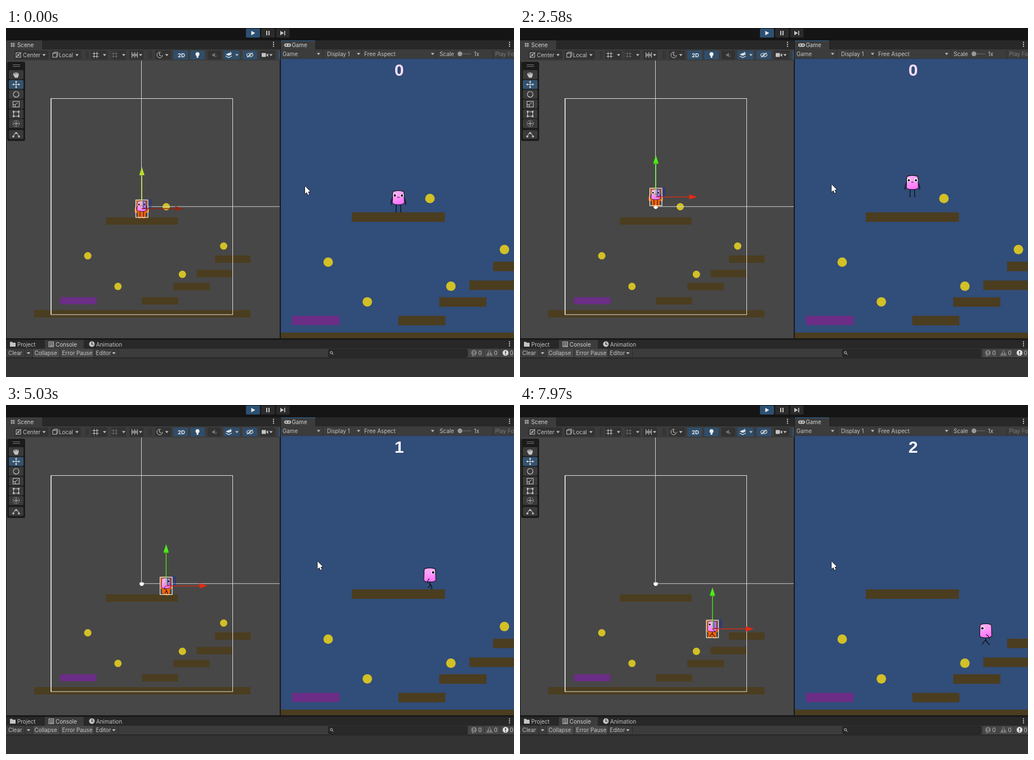
Write an HTML page with a canvas that moves like this. It is 902 px wide and 621 px high and loops after 8000 ms.

```html
<!DOCTYPE html>
<html>
<head>
<meta charset="utf-8">
<style>
html, body { margin: 0; width: 100%; height: 100%; overflow: hidden; background: #191919; }
canvas { display: block; }
</style>
</head>
<body>
<canvas id="stage" width="902" height="621"></canvas>
<script>
const ctx = document.getElementById('stage').getContext('2d');
const LOOP = 8000, ZOOM = 1.297, TAU = Math.PI * 2;
const UI = 'Inter, sans-serif';
const BROWN = '#4b3d1f', GOLD = '#d2c026', INK = '#c4c4c4', BLUE = '#304d69';

// platforms: x, y, width (scene coordinates)
const platforms = [[50, 502, 384], [177.5, 337, 127.5], [371, 404.7, 63], [338.5, 430.5, 64],
  [297.3, 453.5, 64.5], [241.3, 479, 64.3]];
// coins: x, y, time collected
const coins = [[284.5, 318, 4610], [386.5, 388, 6540], [145.2, 405.3, 1e9], [313.2, 438.3, 1e9], [198.8, 459.8, 1e9]];
const walk = [[0, 241], [3950, 241], [4110, 247.5], [5030, 284], [5450, 316], [5780, 345.5], [5850, 354],
  [6150, 376], [6600, 400], [6800, 404], [6870, 403], [7000, 396], [7410, 372], [7970, 341.5], [8000, 340]];

function track(keys, t) {
  let i = 1;
  while (i < keys.length - 1 && keys[i][0] < t) i++;
  const [t0, a] = keys[i - 1], [t1, b] = keys[i];
  return a + (b - a) * Math.min(1, (t - t0) / (t1 - t0));
}

function jump(t, peak) {
  const s = (t - peak) / 606;
  return Math.max(0, 1 - s * s) * 26.5;
}

function heroY(t) {
  if (t < 5000) return 321 - jump(t, 1650) - jump(t, 2860);
  if (t < 5430) return 321.3;
  if (t < 7620) return Math.min(388.7, 321 + 53 * Math.pow((t - 5430) / 1170, 1.85));
  return 388.7 + 75 * Math.pow((t - 7620) / 1000, 2);
}

function box(x, y, w, h, c) { ctx.fillStyle = c; ctx.fillRect(x, y, w, h); }

function round(x, y, w, h, c, r = 2) {
  ctx.fillStyle = c;
  ctx.beginPath(); ctx.roundRect(x, y, w, h, r); ctx.fill();
}

function disc(x, y, r, c, ry = r) {
  ctx.fillStyle = c;
  ctx.beginPath(); ctx.ellipse(x, y, r, ry, 0, 0, TAU); ctx.fill();
}

function ring(x, y, r, c = INK) {
  ctx.strokeStyle = c; ctx.lineWidth = 1;
  ctx.beginPath(); ctx.arc(x, y, r, 0, TAU); ctx.stroke();
}

function poly(pts, c) {
  ctx.fillStyle = c;
  ctx.beginPath();
  for (let i = 0; i < pts.length; i += 2) ctx.lineTo(pts[i], pts[i + 1]);
  ctx.closePath(); ctx.fill();
}

function line(c, w, ...pts) {
  ctx.strokeStyle = c; ctx.lineWidth = w;
  ctx.beginPath();
  for (let i = 0; i < pts.length; i += 2) ctx.lineTo(pts[i], pts[i + 1]);
  ctx.stroke();
}

function frame(x, y, w, h, c = INK, lw = 1) {
  ctx.strokeStyle = c; ctx.lineWidth = lw; ctx.strokeRect(x, y, w, h);
}

function label(s, x, y, c = INK, font = '9.8px ' + UI) {
  ctx.font = font; ctx.fillStyle = c;
  ctx.textAlign = 'left'; ctx.textBaseline = 'alphabetic';
  ctx.fillText(s, x, y);
}

function caret(x, y) { poly([x - 3, y - 1.5, x + 3, y - 1.5, x, y + 2], INK); }
function kebab(x, y) { for (const d of [-3.5, 0, 3.5]) box(x - 1, y + d - 1, 2, 2, INK); }

// Limbs and body outline, relative to the pivot
function heroLimbs(pose, color, w) {
  const { dir, swing } = pose;
  ctx.strokeStyle = color; ctx.lineWidth = w; ctx.lineCap = 'round';
  ctx.beginPath();
  if (dir) {
    const s = 1 + Math.abs(swing) * 7, lift = (1 - Math.abs(swing)) * 4;
    ctx.moveTo(0, 7); ctx.lineTo(0, 11);
    ctx.moveTo(0, 11); ctx.quadraticCurveTo(-s * .4 + lift * dir, 14, -s, 19 - lift * .5);
    ctx.moveTo(0, 11); ctx.quadraticCurveTo(s * .4 + lift * dir, 14, s, 19);
    ctx.lineTo(s + dir, 19);
  } else {
    for (const k of [-1, 1]) {
      ctx.moveTo(k * 4, 7); ctx.lineTo(k * 4, 19.5); ctx.lineTo(k * 4 + k, 19.5);
      ctx.moveTo(k * 10, -5); ctx.quadraticCurveTo(k * 13.5, 0, k * 13, 7);
    }
  }
  ctx.stroke();
}

function bodyPath() {
  ctx.beginPath();
  ctx.moveTo(-10, -15);
  ctx.bezierCurveTo(-8, -18.8, 8, -18.8, 10, -15);
  ctx.lineTo(10.7, 4);
  ctx.bezierCurveTo(8, 8.2, -8, 8.2, -10.7, 4);
  ctx.closePath();
}

function hero(x, y, pose, selected) {
  const { dir, swing } = pose;
  ctx.save();
  ctx.translate(x, y);
  ctx.scale(1 / ZOOM, 1 / ZOOM);
  if (selected) {
    ctx.lineJoin = 'round';
    heroLimbs(pose, '#ff6a0c', 7);
    box(-9, 5, 18, 13, '#f8640a');
    bodyPath(); ctx.strokeStyle = '#ff6a0c'; ctx.lineWidth = 6; ctx.stroke();
  }
  heroLimbs(pose, '#10101a', 1.4);
  const g = ctx.createLinearGradient(-4, -18, 4, 8);
  g.addColorStop(0, '#ffb2f2'); g.addColorStop(.5, '#ff92fb'); g.addColorStop(1, '#ff6cff');
  bodyPath();
  ctx.fillStyle = g; ctx.fill();
  ctx.strokeStyle = '#15101c'; ctx.lineWidth = 1.1; ctx.stroke();
  if (dir) {
    disc(dir * 5.3, -10, 3, '#fff');
    disc(dir * 5.8, -9.8, 2.1, '#08080c');
    line('#15101c', 1.2, -dir, 1.5, -dir * (3 + Math.abs(swing) * 3), 5, -dir * (2 + Math.abs(swing) * 6), 9);
  } else {
    for (const k of [-1, 1]) {
      disc(k * 6.5, -9.5, 3.3, '#fff', pose.open);
      disc(k * 6.3, -9.2, 2, '#08080c', 2);
    }
    line('#15101c', 1, -1.8, -6, 1.8, -6);
  }
  ctx.restore();
}

function world(t) {
  for (const [x, y, w] of platforms) box(x, y, w, 13, BROWN);
  box(95.7, 479, 65, 12.6, '#6b2d85');
  for (const [x, y, end] of coins) if (t < end) disc(x, y, 6.5, GOLD);
}

function gizmo(x, y, dim) {
  const green = dim ? '#b9dc2c' : '#4fee18', red = dim ? '#8f2616' : '#e52a12';
  box(x + 2, y - 15, 14, 14, 'rgba(20,40,150,.3)');
  frame(x + 2.5, y - 15.5, 14, 15, '#20349c');
  frame(x - 10.5, y - 15, 21.5, 31, '#f0f5dc', 1.2);
  line(green, 1.3, x + .3, y, x + .3, y - 58);
  line(red, 1.3, x, y + .5, x + 60, y + .5);
  poly([x - 4.5, y - 59, x + .3, y - 73.5, x + 5, y - 59], green);
  poly([x + 59.5, y - 4, x + 74, y + .5, x + 59.5, y + 5], red);
  if (!dim) disc(x + .3, y - 59, 4.5, '#3fc80f', 1.3);
}

function sceneView(t, x, y, pose) {
  ctx.save();
  ctx.beginPath(); ctx.rect(1, 58, 485, 494); ctx.clip();
  box(0, 58, 487, 494, '#474747');
  world(t);
  line('#d0d0d0', 1, 240.5, 58, 240.5, 318);
  line('#d0d0d0', 1, 241, 317.8, 487, 317.8);
  frame(80, 125.5, 322.5, 384.5, '#dedede');
  line('#e8e8e8', 1.4, 80, 125.5, 80, 510);
  round(237, 315.5, 8, 5, '#f2e6f0', 2);
  disc(241, 319, 3, '#fff');
  hero(x, y, pose, true);
  gizmo(x, y, t < 830);
  ctx.restore();
}

function gameView(t, x, y, pose) {
  ctx.save();
  ctx.beginPath(); ctx.rect(488, 54.5, 414, 498); ctx.clip();
  box(488, 54, 414, 499, '#314d79');
  ctx.save();
  ctx.translate(696.3 - 241 * ZOOM, 303.4 - 318 * ZOOM);
  ctx.scale(ZOOM, ZOOM);
  world(t);
  hero(x + .3, y, pose, false);
  ctx.restore();
  const score = coins.filter(c => t >= c[2]).length;
  ctx.textAlign = 'center'; ctx.textBaseline = 'alphabetic';
  ctx.font = 'bold 30px "Liberation Sans", Arial, sans-serif';
  ctx.fillStyle = score ? '#f8f6fa' : '#f8dcf5';
  ctx.fillText(score, 698, 85);
  ctx.restore();
}

function toolPalette() {
  round(2, 60, 32, 141, '#1b1b1b', 3);
  box(12, 65, 13, 1, '#777'); box(12, 68, 13, 1, '#777');
  [83, 100.5, 118, 135.5, 153, 170, 189.5].forEach((y, i) => {
    round(5, y - 8, 26, 16, i === 1 ? '#35536f' : '#3a3a3a', 2);
  });
  for (let i = 0; i < 4; i++) line(INK, 1.6, 14.5 + i * 2.2, 84, 14 + i * 2.5, 78.5 + Math.abs(i - 1.5));
  poly([12, 82, 14, 83, 23, 82, 21, 88.5, 16, 88.5], INK);
  line('#e0e0e0', 1, 12, 100.5, 24, 100.5);
  line('#e0e0e0', 1, 18, 95, 18, 106);
  for (const k of [-1, 1]) {
    poly([18 + k * 7, 100.5, 18 + k * 4, 98.5, 18 + k * 4, 102.5], '#e0e0e0');
    poly([18, 100.5 + k * 7, 16, 100.5 + k * 4, 20, 100.5 + k * 4], '#e0e0e0');
    ctx.strokeStyle = INK; ctx.lineWidth = 1.1;
    ctx.beginPath(); ctx.arc(18, 118, 5, k * .8 - .6, k * .8 + 1.7); ctx.stroke();
    ctx.beginPath(); ctx.arc(18, 118, 5, k * .8 + 2.4, k * .8 + 4); ctx.stroke();
  }
  frame(12.5, 130.5, 11, 10);
  frame(12.5, 136.5, 4, 4);
  line(INK, 1, 17, 136, 21, 132.5);
  frame(13.5, 149, 9, 8);
  for (const px of [13.5, 22.5]) for (const py of [149, 157]) box(px - 1.5, py - 1.5, 3, 3, INK);
  ctx.setLineDash([2, 1.5]); ring(18, 170, 5.5); ctx.setLineDash([]);
  line(INK, 1, 14, 170, 22, 170); line(INK, 1, 18, 166, 18, 174);
  line(INK, 1, 13, 193, 16, 187, 20, 187, 23, 193);
  for (const [px, py] of [[13, 193], [18, 187], [23, 193]]) disc(px, py, 1.8, INK);
}

function topBar() {
  box(0, 0, 902, 22, '#151515');
  round(426, 1, 25, 16, '#2c5072');
  round(453, 1, 24.5, 16, '#2b2b2b');
  round(479.5, 1, 24, 16, '#2b2b2b');
  poly([435.5, 5, 442.5, 9, 435.5, 13], '#e8e8e8');
  box(462, 5, 2, 8, INK); box(466, 5, 2, 8, INK);
  poly([487, 5, 493.5, 9, 487, 13], INK); box(494, 5, 1.6, 8, INK);
}

function gridIcon(x, y, c) {
  for (const d of [-2.5, 2.5]) {
    line(c, 1, x - 5.5, y + d, x + 5.5, y + d);
    line(c, 1, x + d, y - 5.5, x + d, y + 5.5);
  }
}

function sceneBar() {
  box(0, 22, 487, 16, '#282828');
  box(0, 22, 64, 16, '#3c3c3c');
  box(0, 38, 487, 20, '#3c3c3c');
  for (const d of [-1.8, 1.8]) {
    line(INK, 1, 8, 30 + d, 16, 30 + d);
    line(INK, 1, 12 + d, 26, 12 + d, 34);
  }
  label('Scene', 20, 33.5, '#d4d4d4');
  kebab(475, 29);

  // x, width, fill
  const plain = '#323232';
  for (const [x, w, c] of [[15, 60, plain], [79, 54, plain], [151, 29, plain], [187, 26, plain], [219, 25, plain],
    [265, 28, plain], [297, 26, BLUE], [327, 26, BLUE], [358, 24, plain], [386, 29, BLUE], [420, 26, BLUE],
    [451, 27, plain], [483, 4, BLUE]]) round(x, 40, w, 16, c);
  for (const x of [142, 145, 254, 257]) box(x, 41, 1, 14, '#2a2a2a');
  for (const x of [67.5, 126, 175, 209, 239, 285.5, 410, 470.5]) caret(x, 48);

  frame(18, 44, 8, 8); line(INK, 1, 17, 53, 27, 43); disc(22, 48, 1.6, INK);
  label('Center', 30, 51.5);
  frame(83, 45, 7, 7); line(INK, 1, 83, 45, 86, 43, 92, 43, 92, 49, 90, 52);
  label('Local', 94, 51.5);
  gridIcon(159, 48, INK);
  gridIcon(193, 48, '#6a6a6a');
  for (let i = 0; i < 5; i++) box(223 + i * 2.5, 43 + (i % 2) * 2, 1, 10 - (i % 2) * 4, INK);
  box(223, 47.5, 11, 1, INK);
  ring(273, 48, 5); disc(275, 46.5, 3.3, '#b0b0b0'); disc(276, 46, 3, plain);
  label('2D', 305, 51.5, '#eee', 'bold 9.5px ' + UI);
  disc(340, 46.5, 3.5, '#eee'); box(338.5, 49, 3, 4, '#eee');
  poly([366, 46.5, 368, 46.5, 371, 44, 371, 52, 368, 49.5, 366, 49.5], '#777');
  line('#777', 1, 373, 52, 373, 48);
  poly([390, 47, 395.5, 44.5, 401, 47, 395.5, 49.5], '#e4e4e4');
  line('#e4e4e4', 1.2, 390, 50, 395.5, 52.5, 401, 50);
  box(398, 42.5, 1.2, 5, '#e4e4e4'); box(396, 44.4, 5, 1.2, '#e4e4e4');
  ctx.strokeStyle = '#e4e4e4'; ctx.lineWidth = 1.2;
  ctx.beginPath(); ctx.ellipse(433, 48, 5.5, 3, 0, 0, TAU); ctx.stroke();
  disc(433, 48, 1.6, '#e4e4e4'); line('#e4e4e4', 1.2, 428, 52, 438, 44);
  box(454, 44.5, 7.5, 7, INK); poly([462, 48, 465.5, 45, 465.5, 51.5], INK);
}

function gameBar() {
  box(488, 22, 414, 16, '#282828');
  box(488, 22, 61, 16, '#3c3c3c');
  box(488, 22, 61, 1.2, '#2c5d87');
  box(488, 38, 414, 16.5, '#3c3c3c');
  round(494, 27.5, 12, 6, INK, 3);
  disc(497.5, 30.5, 1.3, '#3c3c3c'); disc(502.5, 30.5, 1.3, '#3c3c3c');
  label('Game', 507.5, 33.5, '#d4d4d4');
  kebab(894, 29);
  for (const x of [562, 631.5, 764, 864]) box(x, 39, 1, 15, '#2e2e2e');
  label('Game', 491, 49.5);
  label('Display 1', 570, 49.5);
  label('Free Aspect', 636, 49.5);
  for (const x of [555, 626, 757.5]) caret(x, 46);
  label('Scale', 770, 49.5);
  box(806, 45.5, 20, 1, '#6e6e6e');
  disc(806, 46, 4.2, '#999');
  label('1x', 831, 49.5);
  label('Play Focused', 868.5, 49.5, '#7c7c7c');
}

function consolePanel() {
  box(0, 552, 902, 69, '#191919');
  box(0, 555, 902, 15.5, '#282828');
  box(69, 555, 69, 16, '#3c3c3c');
  box(0, 570.5, 902, 16, '#3c3c3c');
  box(0, 587.5, 902, 34, '#333');
  poly([7, 558.5, 11, 558.5, 12, 560, 17, 560, 17, 567, 7, 567], INK);
  label('Project', 20, 566.5);
  frame(76, 558.5, 8.5, 8.5);
  for (const y of [560.5, 562.7, 565]) box(77.5, y, 6, 1, INK);
  label('Console', 88, 566.5, '#d4d4d4');
  disc(152.5, 562.5, 5, INK); line('#282828', 1.2, 152.5, 559, 152.5, 563, 155.5, 563);
  label('Animation', 160, 566.5);
  kebab(894, 562);

  round(48, 571, 47, 15, '#484848', 1);
  round(97, 571, 58, 15, '#484848', 1);
  for (const x of [33, 47, 95.5, 156, 199]) box(x, 571, 1, 15, '#2c2c2c');
  label('Clear', 4, 582);
  label('Collapse', 50.5, 582);
  label('Error Pause', 99.5, 582);
  label('Editor', 159.5, 582);
  caret(40, 578.5); caret(191.5, 578.5);
  round(572, 571.5, 247, 14, '#1f1f1f', 3);
  round(573, 572.5, 245, 12, '#292929', 3);
  ring(577.7, 577.5, 2); line(INK, 1, 579, 579, 581.5, 581.5);

  for (const [x, w] of [[822, 26.5], [850, 26.5], [878, 24]]) {
    round(x, 571, w, 15, '#474747', 1);
    label('0', x + 16.5, 582);
  }
  disc(831, 578, 5, '#7d7d7d'); poly([828, 582, 832, 582, 828, 585], '#7d7d7d');
  poly([858.5, 572.5, 864.5, 583, 852.5, 583], '#7d7d7d');
  disc(887, 578, 5.2, '#dedede');
  for (const x of [831, 858.5, 887]) { box(x - .8, 575, 1.6, 4, '#3a3a3a'); box(x - .8, 580.2, 1.6, 1.5, '#3a3a3a'); }
}

function pointer(t) {
  const k = Math.min(1, Math.max(0, (t - 60) / 370));
  ctx.save();
  ctx.translate(531 + 22.3 * k, 281.5 - 3.2 * k - 10 * Math.sin(Math.PI * k));
  const shape = [0, 0, 0, 13.5, 3, 10.8, 5.3, 15.5, 7.4, 14.5, 5.3, 10, 9, 9.3];
  ctx.lineJoin = 'round';
  line('#15151c', 1.6, ...shape, 0, 0);
  poly(shape, '#fff');
  ctx.restore();
}

function draw(t) {
  ctx.lineCap = 'butt';
  const x = track(walk, t), y = heroY(t);
  const pose = {
    dir: t < 3950 ? 0 : t < 6800 ? 1 : -1,
    swing: Math.sin(TAU * (t - 5000) / 680),
    open: t < 430 ? 2.4 : 3.2
  };
  box(0, 0, 902, 621, '#191919');
  sceneView(t, x, y, pose);
  gameView(t, x, y, pose);
  topBar();
  sceneBar();
  gameBar();
  toolPalette();
  consolePanel();
  pointer(t);
}

const start = performance.now();
function tick() {
  draw((performance.now() - start) % LOOP);
  requestAnimationFrame(tick);
}
tick();
</script>
</body>
</html>
```
